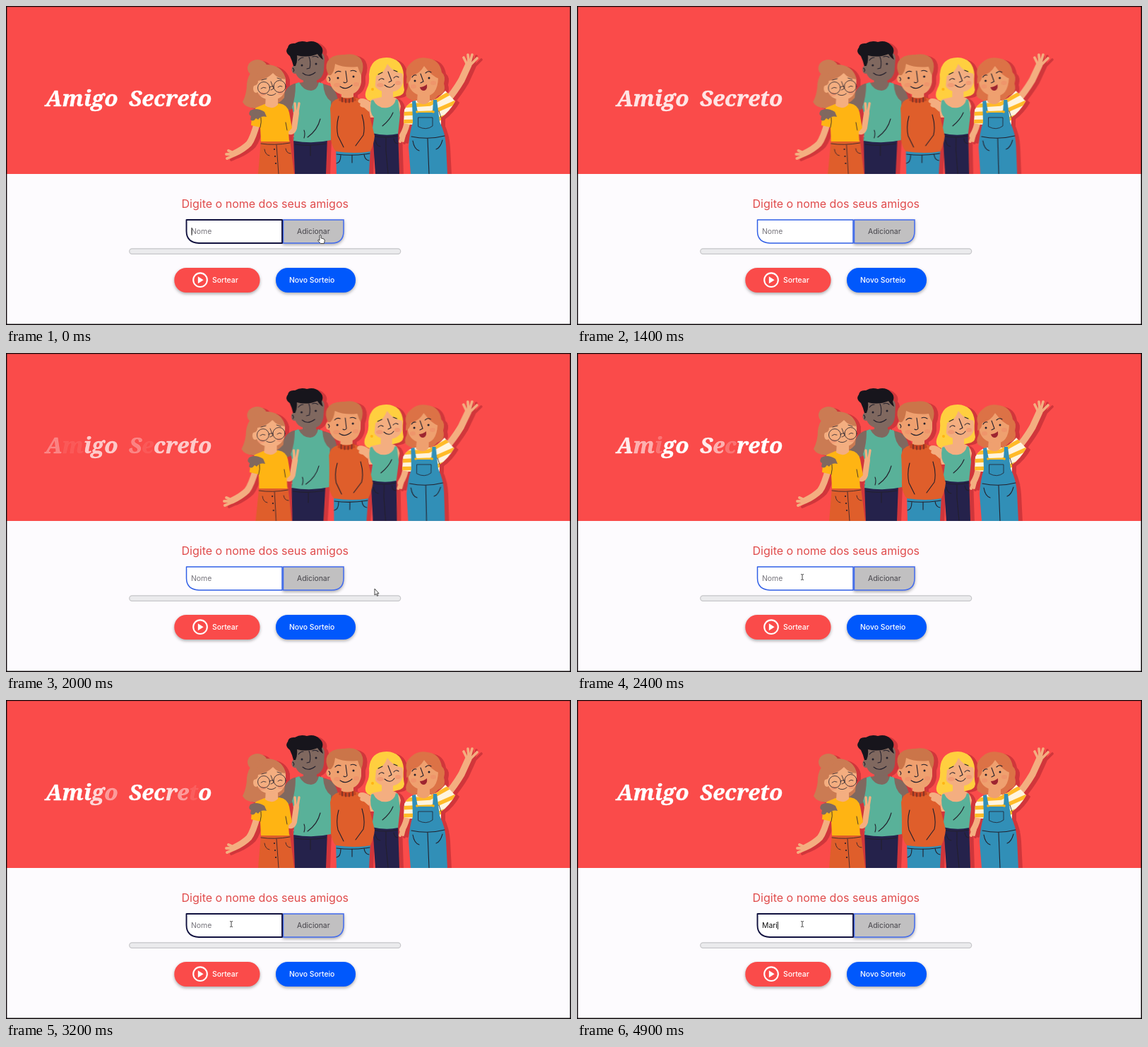
An HTML page for the animation above (5000 ms loop, 800 by 452 pixels).

```html
<!DOCTYPE html>
<html lang="pt">
<head>
<meta charset="utf-8">
<title>Amigo Secreto</title>
<style>
html, body { margin: 0; width: 100%; height: 100%; overflow: hidden; background: #fdfbfe; }
svg { display: block; width: 100vw; height: 100vh; }
text { font: 10.4px Inter, sans-serif; white-space: pre; }
#title text { font: italic bold 31.3px "Noto Serif", serif; fill: #fff; stroke: #fff; stroke-width: .45; }
.btn { filter: drop-shadow(0 2px 2px rgba(0,0,0,.32)); }
#people { filter: drop-shadow(6px 2px .6px rgba(95,0,20,.27)); }
.ink { fill: none; stroke: #23202c; stroke-width: 1.1; stroke-linecap: round; stroke-linejoin: round; }
.thin { stroke-width: .8; }
.dot { fill: #23202c; }
.blush { fill: #f08a68; opacity: .5; }
.peach { fill: #f4ae80; }
.tan { fill: #efa06f; }
.dark { fill: #80685f; }
.teal { fill: #59b199; }
.navy { fill: #25224b; }
.denim { fill: #318fb7; }
.yellow { fill: #ffb413; }
.orange { fill: #df5e2b; }
.arm { fill: none; stroke-linecap: round; stroke-linejoin: round; }
</style>
</head>
<body>
<svg viewBox="0 0 800 452" preserveAspectRatio="none">
<clipPath id="hero"><rect width="800" height="238"/></clipPath>
<clipPath id="tee"><path d="M564 147Q570 136 580 134L603 134Q612 132 622 120L636 135Q628 150 616 158L616 168H573L563 166Z"/></clipPath>
<rect width="800" height="452" fill="#fdfbfe"/>
<rect width="800" height="238" fill="#fa4b4a"/>
<g id="title"></g>

<g clip-path="url(#hero)"><g id="people">
  <!-- tall friend -->
  <g>
    <path class="dark" d="M421 98H440V108L458 113Q469 119 471 140L455 145L404 146Q380 158 362 161L358 150Q380 143 392 130Q396 114 408 110L421 108Z"/>
    <path class="navy" d="M407 186H455L453 238H409Z"/>
    <path class="teal" d="M410 110L415 108Q421 120 432 120Q441 119 443 108L449 110Q450 128 460 135V190Q435 196 407 191Q410 160 405 143Q410 130 410 110Z"/>
    <ellipse class="dark" cx="409" cy="90" rx="4.5" ry="6"/>
    <path class="dark" d="M407 71Q411 61 430 61Q450 62 451 74L450 91Q448 107 431 107Q412 107 409 91Z"/>
    <path d="M407 85Q405 77 402 71Q394 65 399 59Q400 52 409 53Q417 48 426 51Q437 48 444 55Q451 61 447 69L449 76Q445 74 441 68Q427 74 412 70Q413 78 410 85Z" fill="#17151c"/>
    <path class="ink" d="M414 77Q417 73 421 73M434 72Q439 70 442 73M429 72Q432 79 430 88L426 89M420 95Q428 102 438 94M406 88Q409 90 407 93M445 160Q441 176 427 186M422 176Q424 181 422 187M409 196Q430 199 453 195M431 197V212"/>
    <circle class="dot" cx="419" cy="84" r="1.5"/><circle class="dot" cx="439" cy="82" r="1.5"/>
  </g>

  <!-- friend with glasses -->
  <g>
    <ellipse cx="356" cy="88" rx="14" ry="12" fill="#cb7b53"/>
    <path d="M335 136Q341 124 341 110Q344 87 366 83Q390 82 396 103L394 130Q378 148 352 145Q339 144 335 136Z" fill="#cb7b53"/>
    <path class="arm" d="M356 164Q350 187 344 195Q336 203 323 209" stroke="#f4ae80" stroke-width="9"/>
    <path class="arm" d="M324 209L315 205M323 210L312 210M324 211L313 216" stroke="#f4ae80" stroke-width="4"/>
    <path class="orange" d="M361 190H402L408 238H357Z"/>
    <path class="arm" d="M398 174Q404 183 408 173L411 152" stroke="#f4ae80" stroke-width="8"/>
    <path class="arm" d="M410 150L409 138M413 150L415 138" stroke="#f4ae80" stroke-width="3.4"/>
    <path class="yellow" d="M366 139L387 138Q399 140 401 151L405 173L400 178L401 192H361L360 172L347 169Q348 151 354 144Z"/>
    <path class="peach" d="M368 127H385V140Q377 148 367 141Z"/>
    <path class="peach" d="M355 103Q357 92 375 91Q394 92 396 106V117Q392 133 376 133Q357 132 355 117Z"/>
    <ellipse class="peach" cx="354" cy="117" rx="4" ry="6"/>
    <path d="M351 113Q351 92 373 85Q392 85 396 104Q385 103 378 95Q369 104 357 106Q357 112 351 113Z" fill="#cb7b53"/>
    <ellipse class="blush" cx="363" cy="125" rx="5" ry="3"/><ellipse class="blush" cx="389" cy="123" rx="4" ry="3"/>
    <g class="ink thin"><circle cx="365" cy="116" r="8.5"/><circle cx="387.5" cy="114" r="8.5"/></g>
    <path class="ink thin" d="M373 115Q376 113 379 114M361 117Q364 114 368 116M385 115Q388 112 391 114M362 105L369 103M384 102L390 104M375 107L379 117L375 119M370 125Q376 129 382 124M360 172Q362 164 361 158M398 176L396 165M361 195Q380 198 402 194M383 197L386 238M366 203Q367 211 373 212M396 202Q397 209 403 209"/>
    <g class="dot"><circle cx="380" cy="203" r="1.1"/><circle cx="381" cy="213" r="1.1"/><circle cx="382" cy="223" r="1.1"/></g>
    <path class="dark" d="M366 150Q355 143 346 148Q342 154 347 156L346 161Q350 165 354 159L357 161Q361 155 369 157Z"/>
  </g>

  <!-- blonde friend -->
  <g>
    <path d="M512 133Q506 128 511 117Q515 110 514 97Q516 73 539 73Q561 74 563 97Q562 110 564 119Q563 127 554 128L520 137Z" fill="#ffcf3f"/>
    <path class="navy" d="M519 178H555L557 238H523Z"/>
    <path class="peach" d="M532 116H548V129Q557 131 559 142L556 158H516Q511 140 518 132L532 129Z"/>
    <path class="teal" d="M517 134L520 133Q526 146 540 144Q550 142 552 132L555 133L558 154L555 181Q538 185 518 180L521 158Q514 151 517 134Z"/>
    <path class="peach" d="M520 97Q522 82 541 81Q560 83 562 98V109Q558 122 542 122Q525 122 521 110Z"/>
    <path d="M515 111Q514 77 539 75Q560 77 562 96Q548 94 540 82Q535 96 524 99L522 120Q515 120 515 111Z" fill="#ffcf3f"/>
    <ellipse class="blush" cx="530" cy="112" rx="5" ry="3"/><ellipse class="blush" cx="555" cy="109" rx="4" ry="3"/>
    <path class="ink" d="M528 105Q531 101 535 104M549 102Q552 98 556 101M527 97L533 94M549 91L554 93M541 93L546 106L542 108M536 112Q544 119 550 111M548 151Q544 161 533 170M519 184Q538 188 555 184M538 187V205L541 238M523 190Q524 198 530 199M549 188Q550 195 555 195"/>
    <circle cx="519" cy="118" r="2" fill="#ffb413"/>
  </g>

  <!-- friend in the sweater -->
  <g>
    <path class="denim" d="M467 201H516L514 238H468Z"/>
    <path class="tan" d="M475 118H492V136H475Z"/>
    <path class="orange" d="M471 131Q482 137 495 130Q507 132 512 144Q517 164 522 184Q521 195 516 206Q495 210 467 206Q459 197 460 180Q460 158 459 145Q461 133 471 131Z"/>
    <path d="M473 128Q483 133 494 128L496 134Q483 140 471 134Z" fill="#c94522"/>
    <ellipse class="tan" cx="458" cy="103" rx="4.5" ry="6"/>
    <path class="tan" d="M457 87Q462 76 481 76Q500 78 503 92V108Q500 126 481 126Q463 125 459 109Z"/>
    <path d="M457 98Q451 87 455 79Q461 68 479 69Q496 66 503 76Q508 85 503 98Q500 93 498 86Q479 88 466 82Q465 93 460 98Z" fill="#cb7549"/>
    <ellipse class="blush" cx="469" cy="112" rx="5" ry="3"/><ellipse class="blush" cx="496" cy="111" rx="4" ry="3"/>
    <circle class="dot" cx="470" cy="102" r="1.5"/><circle class="dot" cx="492" cy="100" r="1.5"/>
    <path class="ink" d="M466 95Q469 91 474 93M488 92Q492 90 496 93M481 92L483 107Q481 110 478 108M473 114Q481 120 490 112M457 101Q460 103 458 106M471 156Q467 170 470 184L478 200M504 154Q509 170 506 183L495 198M468 210Q491 213 515 209M490 211V222M474 211Q474 222 468 223M507 210Q508 218 514 219"/>
    <path class="ink thin" d="M476 130V136M481 132V137M486 132V137M491 130V136"/>
    <path class="peach" d="M516 136Q506 129 500 132Q496 136 502 138Q499 143 507 144L514 150Z"/>
  </g>

  <!-- waving friend -->
  <g>
    <path d="M572 132Q564 129 567 120Q571 112 568 101Q563 89 574 80Q583 71 597 74Q614 76 617 94Q623 99 620 110Q624 123 612 127L603 136H580Z" fill="#dc7246"/>
    <path class="arm" d="M622 137Q635 122 645 105L655 83" stroke="#f4ae80" stroke-width="9.5"/>
    <path class="arm" d="M653 83L648 73M655 79L654 69M657 80L660 69M659 82L667 74" stroke="#f4ae80" stroke-width="3.6"/>
    <path class="arm" d="M569 160Q567 174 561 184" stroke="#f4ae80" stroke-width="8.5"/>
    <path class="arm" d="M561 183L558 192M564 183L562 191" stroke="#f4ae80" stroke-width="4"/>
    <g clip-path="url(#tee)">
      <rect x="555" y="115" width="85" height="60" fill="#fff4df"/>
      <path d="M555 142L600 139L640 117M555 153L603 151L644 133M555 164L605 163L645 148" fill="none" stroke="#ffba28" stroke-width="5.5"/>
    </g>
    <path class="tan" d="M583 121H600V135Q592 143 582 136Z"/>
    <path class="denim" d="M575 135L580 134L583 151H604L605 133L610 133L614 164Q622 180 623 198L625 238H573L570 200Q571 180 576 165Z"/>
    <path class="tan" d="M570 100Q574 84 592 84Q611 87 612 102Q611 129 591 128Q573 125 570 110Z"/>
    <path d="M567 110Q566 82 589 77Q613 78 615 104Q603 100 592 85Q586 96 574 99Q573 108 567 110Z" fill="#dc7246"/>
    <ellipse class="blush" cx="577" cy="114" rx="4" ry="3"/><ellipse class="blush" cx="605" cy="109" rx="4" ry="3"/>
    <path d="M586 115Q591 115 596 111Q597 119 592 120Q587 120 586 115Z" fill="#9d2530"/>
    <circle class="dot" cx="579" cy="106" r="1.5"/><circle class="dot" cx="599" cy="102" r="1.5"/>
    <path class="ink" d="M575 101Q577 97 581 98M594 95Q598 91 602 94M587 96L591 107L587 109M574 185Q598 190 621 184M597 188L599 238M576 191Q578 203 585 205M618 190Q615 201 609 203"/>
    <path class="ink thin" d="M584 158H604V170Q595 177 584 171ZM613 149L616 158"/>
    <circle cx="582" cy="150" r="1.8" fill="#ffb413"/><circle cx="605" cy="150" r="1.8" fill="#ffb413"/>
  </g>
</g></g>

<text x="248.5" y="285.5" fill="#e04c4c" style="font-size:16.03px">Digite o nome dos seus amigos</text>
<path class="btn" d="M392.5 303H478V319Q478 336 461 336H392.5Z" fill="#c1c0c1" stroke="#426bee" stroke-width="1.5"/>
<text x="412" y="323" fill="#454349">Adicionar</text>
<path id="field" d="M255.5 303H391V336H273Q255.5 335 255.5 319Z" fill="#fff" stroke-linejoin="round"/>
<text id="value" x="262" y="322.7"></text>
<path id="caret" d="M0 314V325" stroke="#222" stroke-width="1"/>
<rect x="174.7" y="343.8" width="384" height="7.6" rx="3.8" fill="#ebebed" stroke="#c6c6c9" stroke-width="1.2"/>
<rect class="btn" x="238.3" y="371" width="121.2" height="35" rx="17" fill="#fa4b4a"/>
<circle cx="275" cy="388.2" r="9.8" fill="none" stroke="#fff" stroke-width="2.1"/>
<path d="M271.8 383.2V393.2L279.6 388.2Z" fill="#fff"/>
<text x="292" y="391.8" fill="#fff" style="font-weight:500">Sortear</text>
<rect class="btn" x="382" y="371" width="113" height="35" rx="17" fill="#0058fc"/>
<text x="401" y="391.8" fill="#fff" style="font-weight:500">Novo Sorteio</text>

<g id="cursor" fill="#fff" stroke="#333" stroke-width=".9" stroke-linejoin="round">
  <path d="M0 7V1Q1 -.8 2.2 1V5L6 6Q7.6 6.6 7.2 9L6.4 12.5H1.4L-2.4 8.6Q-2.8 6.4 0 8.2Z"/>
  <path d="M0 0V9L2.1 7.3 3.6 10.3 4.9 9.7 3.5 6.7H6Z"/>
  <path d="M-2 -4Q0 -4 0 -3Q0 -4 2 -4M0 -3V3M-2 4Q0 4 0 3Q0 4 2 4" fill="none"/>
</g>
<path d="M.6 .4H799.3V451.2H.6Z" fill="none" stroke="#0c0709" stroke-width="1.5"/>
</svg>

<script>
const $ = id => document.getElementById(id);
const NS = "http://www.w3.org/2000/svg";
const add = (parent, tag) => parent.appendChild(document.createElementNS(NS, tag));
const clamp = v => Math.max(0, Math.min(1, v));

// keys: [time, value, value, ...] rows, linear in between
function track(keys, t) {
  const i = keys.findIndex(k => k[0] > t);
  if (i < 0) return keys[keys.length - 1].slice(1);
  const a = keys[i - 1], b = keys[i], p = (t - a[0]) / (b[0] - a[0]);
  return a.slice(1).map((v, j) => v + (b[j + 1] - v) * p);
}

const letters = [];
[["Amigo", 56], ["Secreto", 174]].forEach(([word, x]) => {
  const line = add($("title"), "text");
  line.setAttribute("x", x);
  line.setAttribute("y", 142.2);
  [...word].forEach((c, i) => {
    const el = add(line, "tspan");
    el.textContent = c;
    letters.push({ el, start: 1600 + 300 * i });
  });
});

const swayKeys = [[0, 0], [1200, 0], [1400, .5], [1900, 1], [2050, 1], [2300, 0]];
const mouseKeys = [[0, 444, 324], [1200, 444, 324], [1300, 640, 290], [1400, 815, 270],
  [1700, 815, 405], [1800, 790, 395], [2000, 522, 334], [2300, 319, 317.5]];
const typed = [3800, 4100, 4400, 4700];

function draw(t) {
  const [sway] = track(swayKeys, t), c = -.02 * sway;
  $("people").setAttribute("transform", `matrix(1 0 ${c} 1 ${-60 * c} 0)`);
  for (const { el, start } of letters) {
    const fade = t < start ? 1 : clamp((t - start) / 900);
    const alpha = fade * (1 - .3 * sway);
    el.setAttribute("fill-opacity", alpha);
    el.setAttribute("stroke-opacity", alpha);
  }

  const focus = t < 1300 || t >= 2700;
  const name = "Mari".slice(0, typed.filter(k => k <= t).length);
  const field = $("field"), value = $("value"), caret = $("caret");
  field.setAttribute("stroke", focus ? "#11113f" : "#315fe6");
  field.setAttribute("stroke-width", focus ? 1.9 : 1.5);
  value.textContent = name || "Nome";
  value.setAttribute("fill", name ? "#111" : "#76747b");
  const blink = t < 1300 ? t % 1000 < 500 : (t - 2700) % 1000 < 500;
  caret.style.display = focus && (name || blink) ? "" : "none";
  const end = name ? value.getComputedTextLength() + .6 : 1;
  caret.setAttribute("transform", `translate(${262 + end} 0)`);

  const [x, y] = track(mouseKeys, t), row = y > 302 && y < 337;
  const kind = row && x > 255 && x < 391 ? 2 : row && x >= 391 && x < 479 ? 0 : 1;
  $("cursor").setAttribute("transform", `translate(${x} ${y})`);
  [...$("cursor").children].forEach((el, i) => el.style.display = i === kind ? "" : "none");
}

function tick() {
  draw(Math.floor(performance.now() / 100) * 100 % 5000);
  requestAnimationFrame(tick);
}
tick();
</script>
</body>
</html>
```
